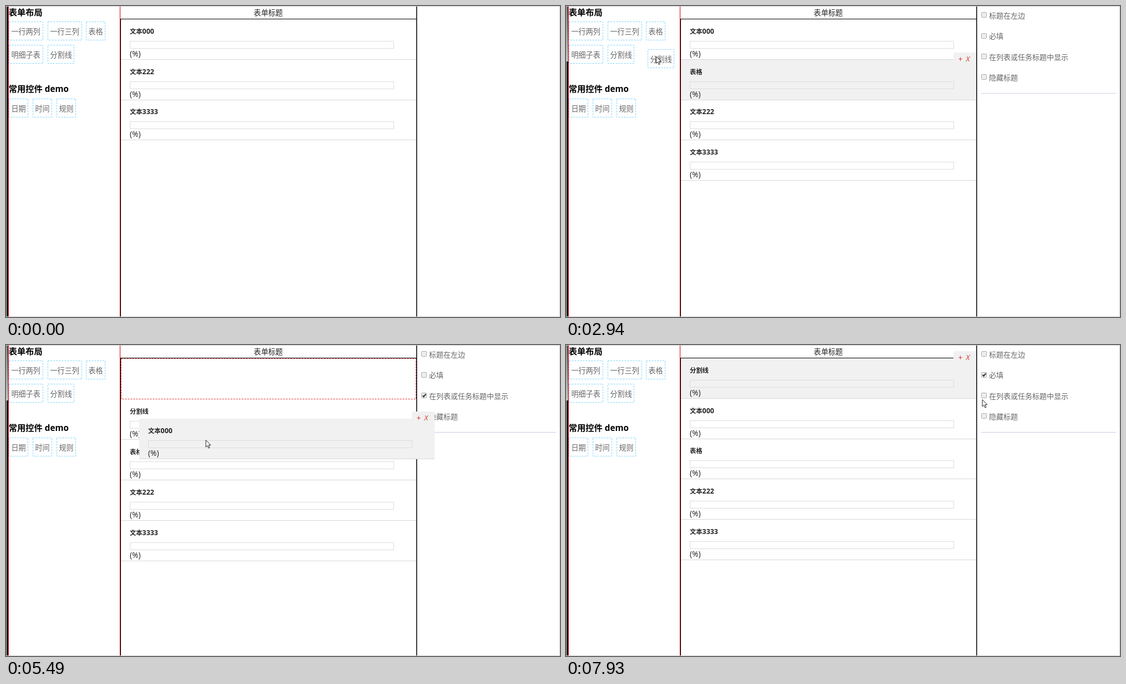
An HTML page that plays this animation: 998 px wide and 561 px high, repeating every 8 s.

```html
<!DOCTYPE html>
<html lang="zh-CN">
<head>
<meta charset="utf-8">
<title>表单设计</title>
<style>
html, body { margin: 0; width: 100%; height: 100%; overflow: hidden; background: #fff; }
svg { display: block; width: 998px; height: 561px; }
text { font-family: "Open Sans", "Noto Sans CJK SC", "Noto Sans CJK", sans-serif; white-space: pre; }
</style>
</head>
<body>
<svg id="stage" viewBox="0 0 998 561"></svg>
<script>
const LOOP = 8000, STEP = 78;
const LEFT = 207, WIDTH = 532, TOP = 24, PITCH = 72.7, GAP_HEIGHT = 74.4;
const stage = document.getElementById('stage');

const [A, B, C, TABLE, SPLIT] = ['文本000', '文本222', '文本3333', '表格', '分割线'];
const options = ['标题在左边', '必填', '在列表或任务标题中显示', '隐藏标题'];

// Chips flow from the left edge, one line after another
const chipWidth = label => label.length * 13.2 + 8.8;
const chips = {};
function chipLine(y, labels) {
  let x = 5;
  for (const label of labels) {
    chips[label] = [Math.round(x), y];
    x += chipWidth(label) + 7.9;
  }
}
chipLine(28, ['一行两列', '一行三列', TABLE]);
chipLine(70, ['明细子表', SPLIT]);
chipLine(167, ['日期', '时间', '规则']);

// The story is a chain of pointer moves, pauses and actions
const moves = [], actions = [];
let clock = 130, spot = [183, 232];
const wait = ms => { clock += ms; };
const act = change => actions.push({ at: clock, change });
function move(ms, x, y) {
  moves.push({ at: clock, ms, from: spot, to: [x, y] });
  spot = [x, y];
  clock += ms;
}
function grab(label, isChip) {
  const from = spot;
  act(s => {
    s.held = { label, isChip, from };
    if (!isChip) s.rows = s.rows.filter(r => r !== label);
  });
}
function drop() {
  const pos = spot;
  act(s => {
    s.rows.splice(slotFor(s.held, pos), 0, s.held.label);
    s.sel = s.held.label;
    s.held = null;
  });
}
const select = label => act(s => { s.sel = label; });
const check = (label, i) => act(s => { s.checked[label] = i; });

// Where a held piece would land: -1 outside the list
function slotFor({ isChip, from }, [x, y]) {
  if (!isChip) return Math.max(0, Math.floor((y - from[1]) / (PITCH * 1.5)));
  return x < LEFT ? -1 : Math.round((y - TOP) / PITCH);
}

move(470, 161, 48);
wait(350);
grab(TABLE, true);
move(200, 182, 90);
move(700, 269.5, 104);
drop();
wait(80);
move(530, 90, 82);
wait(150);
grab(SPLIT, true);
move(1040, 323.5, 109.5);
wait(80);
drop();
move(430, 327, 62.5);
wait(230);
select(A);
grab(A, false);
move(560, 366.5, 97.3);
move(540, 359.5, 171);
move(80, 357, 173.5);
move(370, 355, 184);
wait(210);
drop();
move(320, 345, 87);
wait(150);
move(150, 380, 76);
select(SPLIT);
move(310, 737.5, 69);
move(390, 768, 58);
wait(80);
move(150, 753, 55);
check(SPLIT, 1);
move(230, 749.5, 98);

function pointerAt(t) {
  const m = moves.filter(v => v.at <= t).pop();
  if (!m) return null;
  const n = Math.max(1, Math.round(m.ms / STEP));
  const k = Math.min(1, Math.floor((t - m.at) / m.ms * n) / n);
  return m.from.map((v, i) => v + (m.to[i] - v) * k);
}
function sceneAt(t) {
  const s = { rows: [A, B, C], sel: null, held: null, checked: { [A]: 2 } };
  actions.filter(a => a.at <= t).forEach(a => a.change(s));
  return s;
}

const rect = (x, y, w, h, fill, extra = '') =>
  `<rect x="${x}" y="${y}" width="${w}" height="${h}" fill="${fill}" ${extra}/>`;
const outline = (x, y, w, h, stroke, extra = '') =>
  rect(x + 0.5, y + 0.5, w - 1, h - 1, 'none', `stroke="${stroke}" ${extra}`);
const DASH = 'stroke-dasharray="3 2"';
const BOLD = 'font-weight="700"';
// Text is placed by the middle of its line
const text = (x, mid, s, size, fill, extra = '') =>
  `<text x="${x}" y="${mid + size * 0.375}" font-size="${size}" fill="${fill}" ${extra}>${s}</text>`;

function chip(label) {
  const [x, y] = chips[label];
  return outline(x, y, Math.round(chipWidth(label)), 34, '#80d4fa', DASH) +
    text(x + 4.5, y + 17.7, label, 13.1, '#666');
}

function row(top, label, on) {
  const y = Math.round(top);
  const name = label.replace(/\d+/, d => `<tspan font-size="12.3">${d}</tspan>`);
  return (on ? rect(LEFT, y, WIDTH, 73, '#f1f1f1') : '') +
    text(223, y + 22, name, 11.3, '#222', BOLD) +
    outline(223, y + 39, 476, 14, '#ddd') +
    text(223, y + 62.2, '(%)', 13.8, '#222') +
    rect(LEFT, y + 72, WIDTH, 1, '#d8d8d8');
}

function tools(top) {
  const y = Math.round(top), style = 'font-style="italic"';
  return `<path d="M698 ${y + 1}v-10q0-4 4-4h37v14z" fill="#f1f1f1"/>` +
    text(706.5, y - 1.5, '+', 14, '#d9382e', style) +
    text(720.5, y - 1.5, 'X', 13, '#d9382e', style);
}

function list({ rows, sel }, slot, gap) {
  let y = TOP, body = '', over = '';
  const all = [...rows];
  if (slot >= 0) all.splice(slot, 0, null);
  for (const label of all) {
    if (label) {
      body += row(y, label, label === sel);
      if (label === sel) over += tools(y);
    } else {
      over += outline(LEFT, Math.round(y), WIDTH, Math.round(gap), '#e0312f', DASH);
    }
    y += label ? PITCH : gap;
  }
  return body + over;
}

function panel(ticked) {
  return options.map((label, i) => {
    const y = 16.4 + i * 37.3;
    const tick = `<path d="M750.6 ${y}l1.8 2.4 4-5" fill="none" stroke="#333" stroke-width="2"/>`;
    return rect(748.5, Math.round(y - 5) + 0.5, 9, 9, '#eee', 'rx="1" stroke="#aaa"') +
      (i === ticked ? tick : '') + text(762, y + 0.8, label, 13, '#666');
  }).join('') + rect(748, 157, 243, 1, '#c9cde4');
}

function frame(t) {
  return outline(0, 0, 998, 561, '#ccc') +
    rect(1, 1, 3, 559, '#111') +
    (t >= 950 ? rect(1, 1, 3, 99, 'url(#fade)') : '') +
    rect(4, 1, 1, 559, '#f00') + rect(205, 1, 1, 559, '#c00') +
    rect(206, 23, 1, 537, '#000') + rect(739, 1, 1.5, 559, '#000') +
    rect(206, 23, 533, 1, '#000');
}

const pointer = ([x, y]) =>
  `<path transform="translate(${x} ${y})" d="M.5 .5v12.6l2.9-2.7 2 4.7 2-.9-2-4.5h4z" fill="#fff" stroke="#222"/>`;

const defs = `<defs><linearGradient id="fade" x2="0" y2="1">
<stop stop-color="#555"/><stop offset="1" stop-color="#bbb"/></linearGradient></defs>`;

function picture(t) {
  const s = sceneAt(t), pos = pointerAt(t), { held } = s;
  let slot = -1, gap = GAP_HEIGHT, carried = '';
  if (held) {
    const dx = pos[0] - held.from[0], dy = pos[1] - held.from[1];
    slot = slotFor(held, pos);
    // A row that still covers its own place keeps the usual height
    if (!held.isChip && dy < PITCH) gap = PITCH;
    const body = held.isChip ? chip(held.label) : row(TOP, held.label, true) + tools(TOP);
    carried = `<g transform="translate(${Math.round(dx)} ${Math.round(dy)})">${body}</g>`;
  }
  return defs + frame(t) +
    text(4.7, 11.5, '表单布局', 15.3, '#000', BOLD) +
    text(4.7, 149.3, '常用控件 demo', 15.3, '#000', BOLD) +
    Object.keys(chips).map(chip).join('') +
    text(472.5, 12.5, '表单标题', 13.1, '#222', 'text-anchor="middle"') +
    (s.sel ? panel(s.checked[s.sel]) : '') +
    list(s, slot, gap) + carried + (pos ? pointer(pos) : '');
}

let shown = '';
function play(now) {
  const next = picture(now % LOOP);
  if (next !== shown) stage.innerHTML = shown = next;
  requestAnimationFrame(play);
}
play(0);
</script>
</body>
</html>
```
